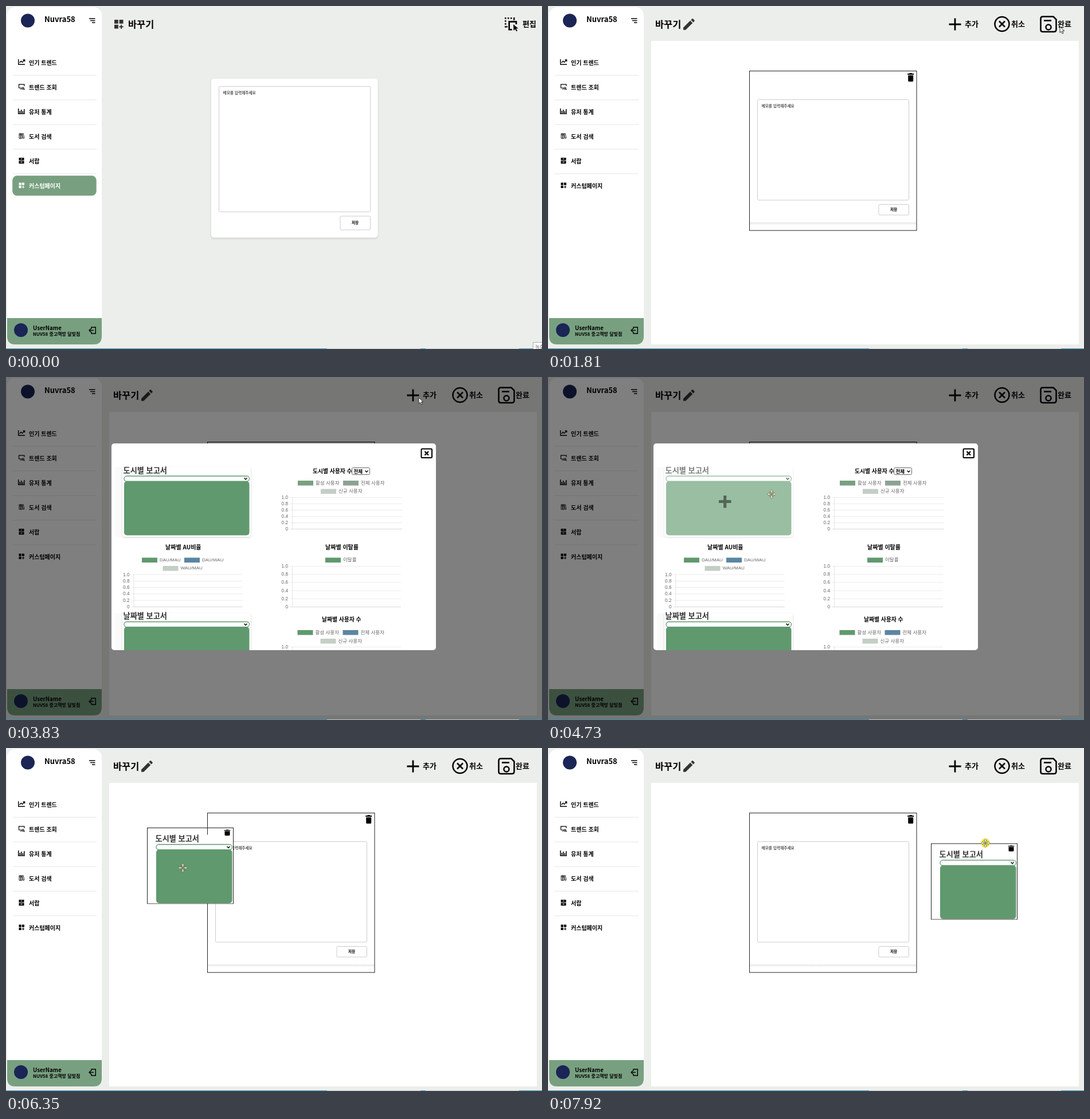
Animation of 935x599 px, one loop 7990 ms. Source, as an HTML page:

```html
<!DOCTYPE html>
<html lang="ko">
<head>
<meta charset="utf-8">
<title>Custom page</title>
<style>
  html, body { margin: 0; width: 100%; height: 100%; overflow: hidden; background: #eceeeb; }
  svg { display: block; width: 100%; height: 100%; }
  text { font-family: "Noto Sans CJK KR", "Noto Sans CJK", "Noto Sans", sans-serif; font-weight: 700; white-space: pre; }
  .light { font-weight: 400; fill: #666; }
  .num { font-family: "Liberation Sans", sans-serif; font-weight: 400; fill: #666; }
  .line { fill: none; stroke: currentColor; }

  .tip, .view, .edit, .modal, .widget, .arrow, .hand, .move, .glow { animation: 7990ms step-end infinite; }
  .tip { animation-name: tip; }
  .view { animation-name: view; }
  .edit { animation-name: edit; }
  .modal { animation-name: modal; }
  .widget { animation-name: widget; }
  .arrow { animation-name: arrow; }
  .hand { animation-name: hand; }
  .move { animation-name: move; }
  .glow { animation-name: glow; }
  .hover { animation: hover 7990ms linear infinite; }
  .plus { animation: plus 7990ms linear infinite; }
  .cursor { animation: cursor 7990ms step-end infinite; }
  .drag { animation: drag 7990ms step-end infinite; }

  @keyframes tip { 0% { opacity: 1 } .87%, 100% { opacity: 0 } }
  @keyframes view { 0% { opacity: 1 } 22.65%, 100% { opacity: 0 } }
  @keyframes edit { 0% { opacity: 0 } 22.65%, 100% { opacity: 1 } }
  @keyframes modal { 0% { opacity: 0 } 46.3% { opacity: 1 } 76.84%, 100% { opacity: 0 } }
  @keyframes widget { 0% { opacity: 0 } 76.84%, 100% { opacity: 1 } }
  @keyframes arrow { 0% { opacity: 1 } 16.64% { opacity: 0 } 22.65% { opacity: 1 } 58.57%, 100% { opacity: 0 } }
  @keyframes hand { 0% { opacity: 0 } 16.64% { opacity: 1 } 22.65%, 100% { opacity: 0 } }
  @keyframes move { 0% { opacity: 0 } 58.57%, 100% { opacity: 1 } }
  @keyframes glow {
    0% { opacity: 0 } 20.9% { opacity: 1 } 22.65% { opacity: 0 }
    45.43% { opacity: 1 } 47.18% { opacity: 0 }
    64.2% { opacity: 1 } 65.83% { opacity: 0 }
    74.34% { opacity: 1 } 76.84% { opacity: 0 }
    88.86%, 100% { opacity: 1 }
  }
  @keyframes hover { 0%, 58.5% { opacity: 1 } 60.07%, 100% { opacity: .2 } }
  @keyframes plus { 0%, 58.5% { opacity: 0 } 60.07%, 100% { opacity: 1 } }
  @keyframes cursor {
    0% { transform: translate(926px, 602px) }
    6% { transform: translate(926px, 602px); animation-timing-function: steps(6, start) }
    11.18% { transform: translate(886px, 260px); animation-timing-function: steps(5, start) }
    15.5% { transform: translate(921px, 45px) }
    16.64% { transform: translate(921px, 45px); animation-timing-function: steps(3, start) }
    19.27% { transform: translate(893px, 36px) }
    24.4% { transform: translate(893px, 36px); animation-timing-function: steps(12, start) }
    35.02% { transform: translate(622px, 131px) }
    35.03% { transform: translate(689px, 91px) }
    35.91% { transform: translate(689px, 91px); animation-timing-function: steps(7, start) }
    42.18% { transform: translate(720px, 36px) }
    50.43% { transform: translate(720px, 36px); animation-timing-function: steps(12, start) }
    60.95% { transform: translate(360px, 220px) }
    68.33% { transform: translate(360px, 220px); animation-timing-function: steps(6, start) }
    73.46% { transform: translate(306px, 217px) }
    78.59% { transform: translate(306px, 217px); animation-timing-function: steps(10, start) }
    88.86% { transform: translate(330px, 140px) }
    91.36% { transform: translate(330px, 140px); animation-timing-function: steps(4, start) }
    95.61% { transform: translate(366px, 148px); animation-timing-function: steps(5, start) }
    100% { transform: translate(763px, 166px) }
  }
  @keyframes drag {
    0% { transform: translate(246.5px, 139.5px) }
    91.36% { transform: translate(246.5px, 139.5px); animation-timing-function: steps(4, start) }
    95.61% { transform: translate(259.5px, 127.5px); animation-timing-function: steps(5, start) }
    100% { transform: translate(668.5px, 167px) }
  }
</style>
</head>
<body>
<svg id="stage" viewBox="0 0 935 599" preserveAspectRatio="none"></svg>
<script>
const GREEN = '#60996e', SAGE = '#78a080', BLUE = '#5c85a1', PALE = '#c3cec5', NAVY = '#1b2556';

// y is the vertical middle of the text
const text = (x, y, size, str, attr = '') =>
  `<text x="${x}" y="${y + size * .37}" font-size="${size}" ${attr}>${str}</text>`;
const rect = (x, y, w, h, fill, attr = '') =>
  `<rect x="${x}" y="${y}" width="${w}" height="${h}" fill="${fill}" ${attr}/>`;
const line = (d, width = 1, attr = '') => `<path class="line" d="${d}" stroke-width="${width}" ${attr}/>`;
const at = (x, y, body, attr = '') => `<g transform="translate(${x} ${y})" ${attr}>${body}</g>`;
const chevron = (x, y) => line(`M${x - 2.5} ${y - 1.3}l2.5 2.6 2.5-2.6`, 1.4);

const grid = s => `<path fill="currentColor" d="M0 0h${s * .44}v${s * .44}H0zM${s * .56} 0h${s * .44}v${s * .44}h-${s * .44}z
  M0 ${s * .56}h${s * .44}v${s * .44}H0z"/>` +
  line(`M${s * .78} ${s * .56}v${s * .46}M${s * .55} ${s * .79}h${s * .46}`, s * .13);

const trash = '<path d="M0 1h3l1-1h3l1 1h3v2H0zM1 4h9v9.5q0 1.5-1.5 1.5h-6q-1.5 0-1.5-1.5z"/>';

// 12 x 10 menu icons
const icons = [
  line('M.7 0v9h11.3M2.5 6l2.8-2.8 2.2 2L11.3 1.3M8.6 1h3v3', 1.4),
  line('M6 7H1.5V.8h9.4V4M3.5 9h3M8.5 6a1.6 1.6 0 1 0 .1 0M9.8 8.6l1.8 1.6', 1.2),
  line('M.7 0v9h11.3M3.3 4v4M5.8 2v6M8.3 4.5v3.5M10.8 1v7', 1.5),
  line('M2 .8h2.4v8.4H2zM4.4 .8h2.4v8.4H4.4zM7 1.3l2.2-.6 1.6 8-2.2.5zM2 3h4.8', .9),
  '<path fill="currentColor" d="M1.5 0h9v4.6h-9zM1.5 5.6h9v4.6h-9z"/>' + line('M4.5 2h3M4.5 7.6h3', 1.1, 'style="stroke:#fff"'),
  at(1.5, .5, grid(9.5))
];
const labels = ['인기 트렌드', '트렌드 조회', '유저 통계', '도서 검색', '서랍', '커스텀페이지'];
const item = i => at(21, 93 + 43 * i, icons[i]) + text(40, 99.5 + 43 * i, 10, labels[i], 'fill="currentColor"');

const sidebar = rect(2, 2, 165, 589, '#fff', 'rx="14"') +
  `<circle cx="38" cy="25.5" r="12" fill="${NAVY}"/>` +
  text(67, 23.5, 13, 'Nuvra58') +
  line('M145 22h10.5M147 25.5h8.5M150 29h5.5', 1.5) +
  labels.map((_, i) => item(i)).join('') +
  [0, 1, 2, 3, 4].map(i => rect(12, 120.5 + 43 * i, 146, 1, '#e4e5e4')).join('') +
  `<path fill="${SAGE}" d="M2 545h165v32q0 14-14 14H16q-14 0-14-14z"/>
   <circle cx="26" cy="566" r="12" fill="${NAVY}"/>` +
  text(47, 562, 9.7, 'UserName') +
  text(47, 573, 8, 'NUV58 중고책방 달빛점') +
  line('M149 564v-3h7.3v11H149v-3M153 566.5h-8M148 563.5l-3 3 3 3', 1.4);

const memo = (x, y, h, by, bh) =>
  rect(x, y, 264, h, '#fff', 'rx="2" stroke="#ccc"') +
  text(x + 7, y + 10.8, 6.7, '메모를 입력해주세요', 'fill="#555"') +
  rect(x + 211.5, by, 52.5, bh, '#fff', 'rx="2" stroke="#ccc"') +
  text(x + 231.5, by + bh / 2, 6.6, '저장');

const dots = [0, 5, 10, 15].map(i => rect(870 + i, 20, 2.6, 2.6, '#111') + (i ? rect(870, 20 + i, 2.6, 2.6, '#111') : '')).join('') +
  rect(885, 22.5, 2.4, 2.4, '#111') + rect(872.5, 35, 2.4, 2.4, '#111');

const view = rect(11.2, 296.3, 146.5, 35, SAGE, 'rx="8"') +
  `<g color="#fff">${item(5)}</g>` +
  at(189, 24, grid(15.5), 'color="#333"') + text(213, 31.5, 16.4, '바꾸기') +
  dots + line('M890 32v-4.6h-12.3v13.8h5', 2.6) +
  '<path d="M885 32l8.5 7.2-3.7.4 2.2 3.6-1.8 1-2-3.7-2.7 2.6z"/>' +
  text(901, 31.5, 13, '편집') +
  rect(358, 127, 290.5, 277.5, '#fff', 'rx="5" filter="url(#soft)"') +
  memo(371.5, 140.5, 219, 367, 24);

const edit = rect(180, 61, 746, 530, '#fff') +
  text(187, 31.5, 16.4, '바꾸기') +
  at(232.7, 18.7, `<path transform="scale(1.1)" fill="#333" d="M3 17.25V21h3.75L17.8 9.94l-3.75-3.75zM20.7 7.04a1 1 0 0 0 0-1.4
    l-2.34-2.35a1 1 0 0 0-1.4 0l-1.83 1.83 3.75 3.75z"/>`) +
  line('M699.5 32h21M710 21.5v21', 2.8) + text(727, 31.5, 13, '추가') +
  '<circle class="line" cx="792" cy="31.5" r="12.5" stroke-width="2.5"/>' +
  line('M787 26.5l10 10M797 26.5l-10 10', 2.6) + text(808, 31.5, 13, '취소') +
  line('M863 18.5h18.5l5 5V41q0 4-4 4H863q-3.5 0-3.5-3.5V22q0-3.5 3.5-3.5zM865 25.5h13', 2.5) +
  '<circle class="line" cx="873" cy="37" r="4.5" stroke-width="2.5"/>' +
  text(889, 31.5, 13, '완료') +
  rect(352, 378, 291, 5, 'url(#fade)') +
  rect(351.5, 113.5, 291.5, 278.5, 'none', 'stroke="#222"') +
  at(627.2, 117, trash) +
  memo(365.5, 163.5, 175.5, 346.5, 18.5);

const report = (title, y, w, h) =>
  text(0, y, 13.2, title, 'fill="#333"') +
  rect(1.5, y + 10, w, 9.2, '#fff', `rx="4.6" stroke="${GREEN}" stroke-width="1.3"`) +
  chevron(w - 5, y + 14.6) +
  rect(1.5, y + 19, w, h, GREEN, 'rx="5"');

const panel = y => rect(190, y, 238, 122, '#fafafa', 'rx="4"') + rect(203, y, 224, 122, '#fff', 'rx="4" filter="url(#soft)"');

const legend = (x, y, color, str, attr = 'class="light"', size = 8.5) =>
  rect(x, y - 4, 27, 8.5, color) + text(x + 31, y - .5, size, str, attr);
const latin = (x, y, color, str) => legend(x, y, color, str, 'class="num"', 8);

// six grid lines from 1.0 down to 0
const chart = (x, y, step, w) => [1, .8, .6, .4, .2, 0].map((v, i) =>
  rect(x, y + step * i, w, .8, i < 5 ? '#e6e6e6' : '#d0d0d0') +
  text(x - 4, y + step * i, 8.2, v ? v.toFixed(1) : '0', 'class="num" text-anchor="end"')).join('') +
  rect(x + 3, y, .8, step * 5, '#ddd');

const modal = rect(0, 0, 935, 598, '#000', 'opacity=".5"') +
  rect(184, 116, 566, 361, '#fff', 'rx="5"') +
  `<g clip-path="url(#sheet)">` +
  rect(724.5, 125.5, 18.5, 15.5, '#fff', 'rx="1.5" stroke="#000" stroke-width="2"') +
  line('M730.5 130l6.5 6.5M737 130l-6.5 6.5', 2.3) +
  `<g class="hover">${panel(157)}${at(204.5, 0, report('도시별 보고서', 163, 218.5, 94.5))}</g>` +
  `<g class="plus">${line('M298 217.5h21.5M308.7 207v21.5', 5.2)}</g>` +
  panel(412) + at(204.5, 0, report('날짜별 보고서', 417.5, 218.5, 94.5)) +
  text(535, 164, 9.8, '도시별 사용자 수') +
  rect(603.5, 158.5, 31, 12, '#fff', 'rx="2" stroke="#666"') + text(606.5, 164.5, 8.5, '전체') + chevron(629, 164.8) +
  legend(509, 185, SAGE, '활성 사용자') + legend(588, 185, '#8da294', '전체 사용자') + legend(549, 199.5, PALE, '신규 사용자') +
  chart(496, 210, 11, 195) +
  text(278, 297, 10, '날짜별 AU비율') +
  latin(237, 319.5, GREEN, 'DAU/MAU') + latin(311, 319.5, BLUE, 'DAU/WAU') + latin(273.5, 334, PALE, 'WAU/MAU') +
  chart(219.5, 344.5, 11.3, 193) +
  text(557, 297, 10, '날짜별 이탈률') + legend(557, 319.5, GREEN, '이탈률') +
  chart(496, 330, 14.2, 193) +
  text(551, 423.5, 9.8, '날짜별 사용자 수') +
  legend(508.5, 446, GREEN, '활성 사용자') + legend(587.5, 446, BLUE, '전체 사용자') + legend(548.5, 461, PALE, '신규 사용자') +
  chart(496, 471, 14.2, 193) + '</g>';

const widget = rect(12.5, 12, 137.5, 120, '#fff') +
  rect(0, 0, 150, 132.5, 'none', 'stroke="#222"') +
  at(134, 3, `<g transform="scale(1 .7)">${trash}</g>`) +
  at(14, 0, report('도시별 보고서', 19, 132.5, 93.5));

const head = [0, 90, 180, 270].map(a => `<path transform="rotate(${a})" d="M0-7.5l2.8 3.2H1V-1H-1v-3.3h-1.8z"/>`).join('');
const cursor = '<circle class="glow" r="8" fill="#f0e62e" fill-opacity=".85"/>' +
  '<path class="arrow" d="M0 0v10.5l2.5-2.3 1.7 4 1.9-.8-1.7-3.9h3.4z" fill="#fff" stroke="#222" stroke-width=".9"/>' +
  `<path class="hand" d="M-1.2 1q0-1.5 1.2-1.5T1.3 1v4.2l5 1.3q1.4.5 1.2 2L6.8 13.5H.4L-3.6 8.8q-.6-1.5.8-1.6l1.6 1.2z"
    fill="#fff" stroke="#222" stroke-width=".9"/>` +
  `<g class="move" fill="#fff" stroke="#55501c" stroke-width=".7">${head}</g>`;

const taskbar = rect(0, 598, 935, 1, '#2a93c4') + rect(560, 598, 163, 1, '#c3c9cb') + rect(732, 598, 163, 1, '#c3c9cb');

document.getElementById('stage').innerHTML = `
  <defs>
    <filter id="soft" x="-5%" y="-5%" width="110%" height="112%"><feDropShadow dx="0" dy="1.5" stdDeviation="1.8" flood-opacity=".16"/></filter>
    <linearGradient id="fade" x2="0" y2="1"><stop stop-color="#e6e6e6"/><stop offset="1" stop-color="#fff"/></linearGradient>
    <clipPath id="sheet"><rect x="184" y="116" width="566" height="361" rx="5"/></clipPath>
  </defs>
  ${rect(0, 0, 935, 599, '#eceeeb')}
  ${sidebar}
  <g class="view">${view}</g>
  <g class="edit">${edit}</g>
  <g class="widget"><g class="drag">${widget}</g></g>
  <g class="modal">${modal}</g>
  ${taskbar}
  <g class="tip">${rect(919.5, 587.5, 20, 20, '#fff', 'stroke="#aaa"')}${text(923, 596, 9, '녹화', 'class="light"')}</g>
  <g class="cursor">${cursor}</g>`;
</script>
</body>
</html>
```
